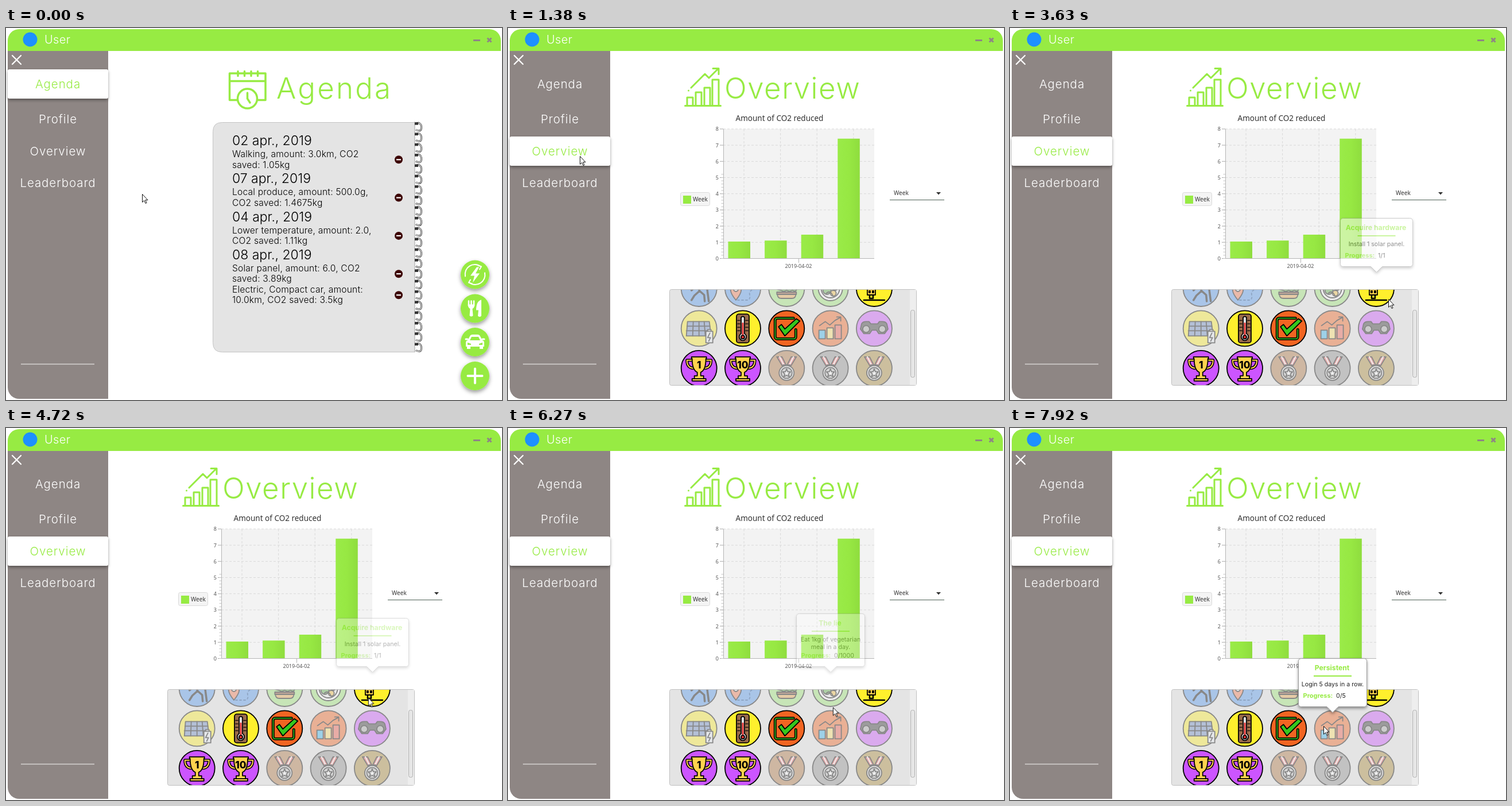
An HTML page for the animation above (7.99 s loop, 864 by 648 pixels).

```html
<!DOCTYPE html>
<html lang="en">
<head>
<meta charset="utf-8">
<title>Agenda and overview</title>
<style>
html, body { margin: 0; width: 100%; height: 100%; overflow: hidden; background: #fff; }
svg { display: block; width: 100%; height: 100%; font-family: Inter, sans-serif; --green: #97eb43; }
.green { fill: var(--green); }
.outline { fill: none; stroke: var(--green); stroke-width: 3.5; stroke-linecap: round; stroke-linejoin: round; }
.outline.thin { stroke-width: 3; }
.white { fill: none; stroke: #fff; stroke-linecap: round; stroke-linejoin: round; }
.nav { font-size: 20.5px; font-weight: 350; letter-spacing: .045em; text-anchor: middle; fill: #fff; }
.nav.on { fill: var(--green); }
.title { font-size: 51px; font-weight: 350; fill: var(--green); }
.date { font-size: 23px; font-weight: 350; }
.entry { font-size: 15.6px; font-weight: 350; letter-spacing: .2px; }
.ui { font-family: "Noto Sans", sans-serif; font-size: 10px; fill: #333; }
.ui.heading { font-size: 13.5px; }
.axis { font-size: 9px; fill: #555; }
.tip text { font-size: 10.6px; fill: #222; }
.tip .head { font-size: 12.2px; font-weight: 700; fill: var(--green); }
.tip .label { font-size: 11px; font-weight: 700; fill: var(--green); }
.mid { text-anchor: middle; }
.badge { stroke: #000; stroke-width: 1.8; stroke-linejoin: round; stroke-linecap: round; }
.locked { opacity: .4; }
.line { fill: none; }
.num { font-size: 17px; font-weight: 800; text-anchor: middle; stroke: none; }

#cursor, #ripple, .page, .tip { animation: 7990ms step-end infinite; }
#cursor { animation-name: cursor; }
#ripple { animation-name: ripple; }
#agenda { animation-name: leave; }
#overview { animation-name: enter; }
#tip1 { animation-name: tip1; }
#tip2 { animation-name: tip2; }
#tip3 { animation-name: tip3; }

@keyframes cursor {
  0% { transform: translate(237px, 289px); }
  1% { transform: translate(237px, 289px); animation-timing-function: steps(9, start); }
  9.58% { transform: translate(125px, 223px); }
  23.15% { transform: translate(125px, 223px); animation-timing-function: steps(9, start); }
  31.82% { transform: translate(276px, 238px); animation-timing-function: steps(2, start); }
  33.75% { transform: translate(342px, 247px); animation-timing-function: steps(11, start); }
  44.55% { transform: translate(659px, 444px); animation-timing-function: steps(2, start); }
  46.3% { transform: translate(659px, 472px); }
  56.19% { transform: translate(659px, 472px); animation-timing-function: steps(10, start); }
  65.93% { transform: translate(565px, 464px); }
  76.47% { transform: translate(565px, 464px); animation-timing-function: steps(7, start); }
  83.3% { transform: translate(567px, 516px); animation-timing-function: steps(4, start); }
  87.2% { transform: translate(567px, 519px); }
  99.12%, 100% { transform: translate(546px, 519px); }
}
@keyframes ripple {
  0% { transform: scale(0); }
  13.64% { transform: scale(0); animation-timing-function: steps(3, start); }
  16.4% { transform: scale(1); }
  17.27%, 100% { transform: scale(0); }
}
@keyframes leave { 0% { opacity: 1; } 17.27%, 100% { opacity: 0; } }
@keyframes enter { 0% { opacity: 0; } 17.27%, 100% { opacity: 1; } }
@keyframes tip1 {
  0% { opacity: 0; }
  44.55% { opacity: 0; animation-timing-function: steps(4, start); }
  48.05% { opacity: 1; }
  58.07% { opacity: 1; animation-timing-function: steps(3, start); }
  61.08%, 100% { opacity: 0; }
}
@keyframes tip2 {
  0% { opacity: 0; }
  62.08% { opacity: 0; animation-timing-function: steps(4, start); }
  65.58% { opacity: 1; }
  77.47% { opacity: 1; animation-timing-function: steps(3, start); }
  80.35%, 100% { opacity: 0; }
}
@keyframes tip3 {
  0% { opacity: 0; }
  83.23% { opacity: 0; animation-timing-function: steps(4, start); }
  86.73%, 100% { opacity: 1; }
}
</style>
</head>
<body>
<svg viewBox="0 0 864 648">
  <defs>
    <filter id="shadow" x="-30%" y="-30%" width="160%" height="180%">
      <feDropShadow dx="0" dy="2.5" stdDeviation="2.5" flood-opacity=".4"/>
    </filter>
    <filter id="lift" x="-30%" y="-30%" width="160%" height="180%">
      <feDropShadow dx="0" dy="3.5" stdDeviation="3.5" flood-opacity=".4"/>
    </filter>
    <linearGradient id="bar"><stop stop-color="#9aeb48"/><stop offset=".5" stop-color="#97e843"/><stop offset="1" stop-color="#8fdd3e"/></linearGradient>
    <clipPath id="tabClip"><path d="M3 189h175v50h-175z"/></clipPath>
    <clipPath id="badgeClip"><path d="M282 456h418v166h-418z"/></clipPath>
    <g id="remove"><circle r="7" fill="#3d0505"/><path d="M-4 0h8" stroke="#fff" stroke-width="2.2"/></g>
    <g id="ring" fill="none">
      <path d="M715 2c10-4 11 13 5 13q-4 0-6-2" stroke="#444" stroke-width="3"/>
      <path d="M715 2c10-4 11 13 5 13q-4 0-6-2" stroke="#eee" stroke-width="1.2"/>
      <path d="M712 2.500h6" stroke="#333" stroke-width="4.500"/>
    </g>
    <g id="cup">
      <path class="line" d="M-12-14h-9q0 13 11 14M12-14h9q0 13-11 14" stroke="#000" stroke-width="5"/>
      <path class="line" d="M-12-14h-9q0 13 11 14M12-14h9q0 13-11 14" stroke="#ffd34e" stroke-width="2"/>
      <path d="M-13-20h26v3h-1q0 20-9 24v6h5v5h4v4h-24v-4h4v-5h5v-6q-9-4-9-24h-1z" fill="#ffd34e"/>
      <path class="line" d="M-8 18h16"/>
    </g>
    <g id="medal">
      <path d="M-17-20h9l10 20h-7zM17-20h-9l-10 20h7z" fill="#ef5a5a"/>
      <path class="line" d="M-12-20l10 20M12-20l-10 20" stroke="#fff" stroke-width="2"/>
      <path d="M-6-6h12v4h-12z" fill="#ccc"/>
      <circle cy="8" r="13" fill="#ddd"/><circle cy="8" r="9.5" fill="#bbb"/>
      <path d="M0 1l2 5 5 0-4 4 2 5-5-3-5 3 2-5-4-4 5 0z" fill="#fff"/>
    </g>
  </defs>

  <path class="green" d="M3 40V22A20 20 0 0 1 23 2H842A20 20 0 0 1 862 22V40z"/>
  <circle cx="42" cy="20" r="12.5" fill="#1e90ff"/>
  <text x="67" y="27" fill="#fff" font-size="20" font-weight="350" letter-spacing=".4">User</text>
  <path d="M814 21.5h12M838.5 17.5l7 7m0-7l-7 7" stroke="#8e8684" stroke-width="3"/>
  <path d="M3 40h175v606H23A20 20 0 0 1 3 626z" fill="#8e8684"/>
  <path class="white" d="M11 48l15 15m0-15l-15 15" stroke-width="2.3"/>
  <path d="M26 585.5h128" stroke="#d6d3d2" stroke-width="1.4"/>
  <g clip-path="url(#tabClip)"><g transform="translate(125 221)"><circle id="ripple" r="89" fill="#fff" opacity=".33"/></g></g>
  <text class="nav" x="90.5" y="105">Agenda</text>
  <text class="nav" x="90.5" y="166">Profile</text>
  <text class="nav" x="90.5" y="222">Overview</text>
  <text class="nav" x="90.5" y="277">Leaderboard</text>

  <g id="agenda" class="page">
    <rect x="3" y="72" width="175" height="51" rx="3" fill="#fff" filter="url(#shadow)"/>
    <text class="nav on" x="90.5" y="105">Agenda</text>
    <g class="outline">
      <path d="M403 125.5H389.5V79H452V125.5H438M390 92.5h62M404 75.500v8M415.500 75.500v8M427 75.500v8M438.500 75.500v8"/>
      <circle cx="420.500" cy="123" r="17" fill="#fff"/>
      <path d="M420.500 113v10l4.500 7"/>
    </g>
    <text class="title" x="471" y="123" letter-spacing="3.200">Agenda</text>
    <path d="M712 164.500H376.500Q360.500 164.500 360.500 180.500V548.500Q360.500 564.500 376.500 564.500H712z" fill="#e4e4e4" stroke="#c4c4c4"/>
    <g id="rings"></g>
    <g id="entries"></g>
    <g class="green" filter="url(#lift)">
      <circle cx="817" cy="429.500" r="25"/><circle cx="817" cy="488.500" r="25"/>
      <circle cx="817" cy="547" r="25"/><circle cx="817" cy="606" r="25"/>
    </g>
    <g transform="translate(817 429.500)">
      <path d="M3-13l-11 15h7l-3 12 12-16h-7l6-11z" fill="#fff"/>
      <path class="white" d="M-17 3A17 17 0 0 1 10-14M17-3A17 17 0 0 1-10 14M5-16l6 2-3 5M-5 16l-6-2 3-5" stroke-width="2"/>
    </g>
    <g transform="translate(817 488.500)">
      <path class="white" d="M-11-13v8M-6.500-13v8M-2-13v8" stroke-width="2.600"/>
      <path d="M-12.300-7h11.600q0 6-3.800 7.500l1 12q-3 3-6 0l1-12q-3.800-1.500-3.800-7.500zM11-15v28q-3 3-6 0l1-10h-4q0-16 9-18z" fill="#fff"/>
    </g>
    <g transform="translate(817 547)">
      <path d="M-16 1q0-3 3-4l4-7q1-3 5-3h8q4 0 5 3l4 7q3 1 3 4v7h-2v4h-6v-4h-16v4h-6v-4h-2zM-9-3h18l-3-6h-12z" fill="#fff" fill-rule="evenodd"/>
      <path class="white" d="M-16-5h3M16-5h-3" stroke-width="3"/>
      <path class="green" d="M-13 1l6 2v2h-6zM13 1l-6 2v2h6z"/>
    </g>
    <path class="white" d="M804.500 606h25M817 593.500v25" stroke-width="4"/>
  </g>

  <g id="overview" class="page">
    <rect x="3" y="189" width="175" height="51" rx="3" fill="#fff" filter="url(#shadow)"/>
    <text class="nav on" x="90.5" y="222">Overview</text>
    <g class="outline thin">
      <path d="M308.500 135.500h62M312 135v-14h10v14M327 135v-23h10v23M342 135v-31h10v31M356 135v-45h11v45M319 104L343 80l7 7 16-16M357 70.500h10v10M314.500 109v.1"/>
    </g>
    <text class="title" x="377" y="123" letter-spacing="1.500">Overview</text>
    <text class="ui heading mid" x="473" y="162">Amount of CO2 reduced</text>
    <g id="chart"></g>
    <rect x="300.500" y="286.500" width="51" height="23" rx="3" fill="#f4f4f4" stroke="#dadada"/>
    <path class="green" d="M305 292h14v14h-14z"/>
    <text class="ui" x="322" y="302">Week</text>
    <text class="ui" x="672" y="291">Week</text>
    <path d="M746 286h8l-4 4.500z" fill="#333"/>
    <path d="M665 299.500h95" stroke="#4d6054"/>
    <rect x="281.500" y="455.500" width="430" height="167" rx="3" fill="#e4e4e4" stroke="#c0c0c0"/>
    <path d="M700 456h11v166h-11z" fill="#eee"/>
    <rect x="701.500" y="491.500" width="7" height="117" rx="3" fill="#e6e6e6" stroke="#b0b0b0"/>
    <g id="badges" clip-path="url(#badgeClip)"></g>
  </g>
  <g id="tips"></g>
  <path id="cursor" d="M.5.500V14.500L3.700 11.500 6 16.500 8 15.600 5.800 10.700H10z" fill="#fff" stroke="#111"/>
</svg>
<script>
const fill = (id, html) => { document.getElementById(id).innerHTML = html; };
const range = n => [...Array(n).keys()];
const text = (cls, x, y, s) => `<text class="${cls}" x="${x}" y="${y}">${s}</text>`;
const path = (d, attrs) => `<path d="${d}" ${attrs}/>`;

fill('rings', path('M712 163v402', 'stroke="#bbb"') +
  range(22).map(i => `<use href="#ring" y="${164 + i * 18.3}"/>`).join(''));

const days = [
  ['02 apr., 2019', 'Walking, amount: 3.0km, CO2', 'saved: 1.05kg'],
  ['07 apr., 2019', 'Local produce, amount: 500.0g,', 'CO2 saved: 1.4675kg'],
  ['04 apr., 2019', 'Lower temperature, amount: 2.0,', 'CO2 saved: 1.11kg'],
  ['08 apr., 2019', 'Solar panel, amount: 6.0, CO2', 'saved: 3.89kg',
    'Electric, Compact car, amount:', '10.0km, CO2 saved: 3.5kg'],
];
fill('entries', days.map(([date, ...lines], i) => {
  const y = 204 + i * 66.3;
  return text('date', 394, y, date) + lines.map((s, j) =>
    text('entry', 394, y + 21 + j * 18.5, s) +
    (j % 2 ? '' : `<use href="#remove" x="684" y="${y + 25.3 + j * 18.5}"/>`)).join('');
}).join(''));

const level = v => 401.5 - v * 28.2;
const dash = 'stroke="#d9d9d9" stroke-dasharray="4 3"';
fill('chart', path('M375 176h263v226h-263z', 'fill="#f3f3f3"') +
  range(9).map(v => path(`M375 ${level(v)}h263`, dash) +
    path(`M369 ${level(v)}h6`, 'stroke="#aaa"') +
    `<text class="ui axis" text-anchor="end" x="367" y="${level(v) + 3.5}">${v}</text>`).join('') +
  range(27).map(i => path(`M371.500 ${level(i / 5)}h3.500`, 'stroke="#c4c4c4"')).join('') +
  [1.05, 1.11, 1.47, 7.4].map((v, i) => {
    const x = 402.5 + i * 63.6;
    return path(`M${x + 8.5} 176v226`, dash) +
      path(`M${x - 19} ${level(v)}h38.500V402h-38.500z`, 'fill="url(#bar)"');
  }).join('') +
  path('M375.500 176v225.500h262.500M506.500 402v7', 'fill="none" stroke="#b5b5b5"') +
  text('ui axis mid', 506, 418, '2019-04-02'));

const blue = '#5398f0', green = '#9de876', yellow = '#fff02d', orange = '#f26522', purple = '#cc55ff';
const medal = '<use href="#medal"/>';
const trophy = n => '<use href="#cup"/>' + text('num', 0, 0, n);
// Each badge: colour, unlocked, artwork around its centre.
const badges = [
  [blue, 0, path('M-4-8L1 4-8 12-13 20M1 4L9 11 10 22M-4-6L-13 3M-2-5L9-1M14-1L17 22', 'class="line" stroke-width="3.500"')],
  [blue, 0, path('M-12 20Q-23 7-21-1-19-9-12-9-5-9-3-1-1 7-12 20z', 'fill="#f47a52"') +
    '<circle cx="-12" cy="1" r="4" fill="#fff"/>' +
    path('M-9 20H6Q14 20 12 11T22 1', 'class="line" stroke-dasharray="3 4" stroke="#124a94"')],
  [green, 0, path('M-17-1Q-14-14 0-14T17-1z', 'fill="#e8a44b"') + path('M-18 1h36l-3 4-5-2-5 2-5-2-5 2-5-2z', 'fill="#52b043"') +
    path('M-17 6h34v4h-34z', 'fill="#8c4b2c"') + path('M-16 10h32q0 7-7 7h-18q-7 0-7-7z', 'fill="#e8a44b"')],
  [green, 0, '<circle r="21" fill="#fff"/><circle r="16" fill="#eee"/><circle cx="-6" cy="3" r="7" fill="#5fb34b"/>' +
    '<circle cx="5" cy="8" r="5" fill="#f6c343"/><circle cx="8" cy="-2" r="5" fill="#ec6a45"/>' + path('M-7 8Q0 2 4 12', 'class="line"')],
  [yellow, 1, path('M-12-8h14V11h-14z', 'fill="#ffd34e"') + path('M-9 4h2v3h-2zM-3 4h2v3h-2z', 'fill="#000"') +
    path('M-8 11v6h6v-6M-18 20h36', 'class="line" stroke-width="2.500"')],
  [yellow, 0, path('M-20-12h38l3 25h-43z', 'fill="#6d8dc4"') + path('M-21-4h40M-22 4h42M-10-12l-1 25M0-12v25M9-12l2 25', 'class="line"') +
    path('M12 5h12v20h-12zM15 2h6v3h-6z', 'fill="#e9eef5"') + path('M19 8l-4 8h5l-3 6', 'class="line"')],
  [yellow, 1, '<rect x="-11" y="-25" width="22" height="50" rx="4" fill="#9a6b4b"/>' +
    path('M-3-19q3-4 6 0V9q4 3 3 7-2 5-6 5t-6-5q-1-4 3-7z', 'fill="#ddd"') + path('M0-9v23', 'stroke="#d33" stroke-width="3"') +
    '<circle cy="15" r="3" fill="#e33"/>' + path('M-9-14h4M-9-8h4M-9-2h4M-9 4h4M5-14h4M5-8h4M5-2h4M5 4h4', 'class="line" stroke-width="1.200"')],
  [orange, 1, path('M12-18h-28q-4 0-4 4v28q0 4 4 4h28q4 0 4-4V2', 'class="line" stroke-width="5"') +
    path('M12-18h-28q-4 0-4 4v28q0 4 4 4h28q4 0 4-4V2', 'class="line" stroke="#2fa51c" stroke-width="2"') +
    path('M-14-3l5-4 6 8L17-17l6 4L-3 13z', 'fill="#35c81e"')],
  [orange, 0, path('M-20 3h11v15h-11z', 'fill="#35b6ee"') + path('M-6-1h11v19h-11z', 'fill="#ffe06a"') + path('M8-6h11v24h-11z', 'fill="#ee5a4a"') +
    path('M-19-5L-9-12-1-6 8-14 17-19M11-20h7v7', 'class="line"')],
  [purple, 0, path('M-22-8q2-4 8-4h5l3 4h12l3-4h5q6 0 8 4l2 9-6 8h-10l-4-6h-8l-4 6h-10l-6-8z', 'fill="#333"') +
    '<circle cx="-14" cy="1" r="6" fill="#aaa"/><circle cx="14" cy="1" r="6" fill="#aaa"/>'],
  [purple, 1, trophy(1)], [purple, 1, trophy(10)],
  ['#af7541', 0, medal], ['#909090', 0, medal], ['#aa8a37', 0, medal],
];
fill('badges', badges.map(([color, unlocked, art], i) =>
  `<g class="badge ${unlocked ? '' : 'locked'}" transform="translate(${332.7 + i % 5 * 76.3} ${454 + (i / 5 | 0) * 69.4})">
    <circle r="31" fill="${color}"/>${art}</g>`).join(''));

function tip(id, x, y, w, h, head, lines, progress) {
  const c = x + w / 2, r = x + w, b = y + h, left = x + 8;
  const box = `M${x + 5} ${y}H${r - 5}q5 0 5 5V${b - 5}q0 5-5 5H${c + 10}l-10 10-10-10H${x + 5}q-5 0-5-5V${y + 5}q0-5 5-5z`;
  return `<g id="${id}" class="tip">${path(box, 'fill="#fff" stroke="#999" filter="url(#shadow)"')}` +
    text('head mid', c - 1, y + 20.5, head) +
    path(`M${c - 33} ${y + 30.5}h66`, 'stroke="#97eb43" stroke-width="2"') +
    lines.map((s, i) => text('mid', c, y + 48.5 + i * 12.5, s)).join('') +
    text('label', left, b - 16, 'Progress:') + text('', left + 57.5, b - 16, progress) + '</g>';
}
fill('tips', tip('tip1', 575.5, 331.5, 126, 84, 'Acquire hardware', ['Install 1 solar panel.'], '1/1') +
  tip('tip2', 502.5, 323.5, 119, 92, 'The lie', ['Eat 1kg of vegetarian', 'meal in a day.'], '0/1000') +
  tip('tip3', 502.5, 401.5, 119, 84, 'Persistent', ['Login 5 days in a row.'], '0/5'));
</script>
</body>
</html>
```
